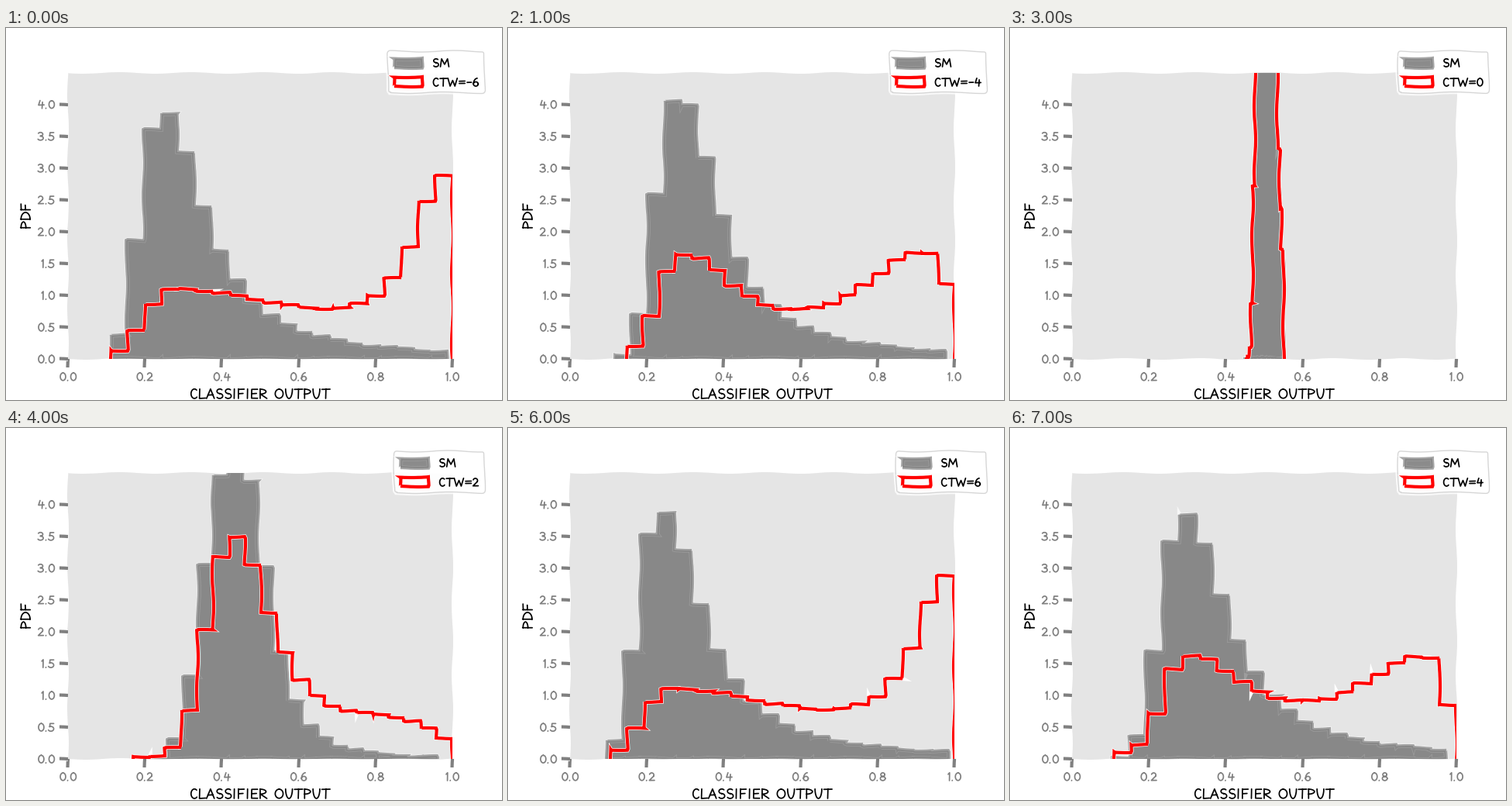
A matplotlib script that plays this animation: 640x480 px, repeating every 8 s.

```python
import numpy as np
import matplotlib.pyplot as plt
from matplotlib.animation import ArtistAnimation
from matplotlib.patches import FancyBboxPatch, PathPatch, Rectangle
from matplotlib.path import Path
from matplotlib.transforms import Affine2D

W, H = 640, 480
STEPS = [-6, -4, -2, 0, 2, 4, 6, 4]
SM_STYLE = dict(fc="gray", ec="gray", alpha=.7, lw=3)
CTW_STYLE = dict(ec="red", lw=3)

# Range of the output, then its main peak (mid, height, rise, fall, power)
SPIKE = (.45, .55, (.5, 25, .02, .02, 3))
SM = {
    -6: (.110, .986, (.250, 3.90, .084, .128, 2)),
    -4: (.116, .976, (.285, 4.15, .083, .120, 2)),
    -2: (.191, .964, (.420, 5.00, .098, .104, 3)),
    0: SPIKE,
    2: (.183, .960, (.430, 4.75, .100, .100, 3)),
    4: (.105, .974, (.295, 3.85, .088, .132, 2)),
    6: (.095, .984, (.240, 3.90, .084, .128, 2)),
}
# The same, followed by a mirrored second peak near one
CTW = {
    -6: (.110, 1, (.280, 1.05, .105, .42, 2), (.975, 2.60, .100, .095, 2)),
    -4: (.147, 1, (.300, 1.50, .089, .16, 2), (.920, 1.60, .086, .200, 2)),
    -2: (.200, 1, (.425, 3.40, .100, .11, 2), (.850, 0.42, .140, .200, 2)),
    0: SPIKE,
    2: (.170, 1, (.437, 3.40, .102, .115, 2), (.850, 0.42, .140, .200, 2)),
    4: (.109, 1, (.305, 1.45, .088, .19, 2), (.920, 1.50, .067, .220, 2)),
    6: (.104, 1, (.270, 1.05, .105, .42, 2), (.975, 2.60, .100, .095, 2)),
}


def bump(x, mid, height, rise, fall, power):
    """Peak with a steep left flank and a long right tail."""
    d = np.abs(x - mid)
    left, right = np.exp(-(d / rise) ** 2.5), 1 / (1 + (d / fall) ** power)
    return height * np.where(x < mid, left, right)


def histogram(lo, hi, peak, end=None, **style):
    edges = np.linspace(lo, hi, 21)
    mids = (edges[1:] + edges[:-1]) / 2
    density = bump(mids, *peak)
    if end:
        density += bump(-mids, -end[0], *end[1:])
    return list(ax.hist(mids, edges, weights=density, **style)[2])


def line(*xy):
    return Path(np.reshape(xy, (-1, 2)))


def arc(x, y, rx, ry, start, stop):
    t = np.radians(np.linspace(start, stop, 24))
    return Path(np.column_stack([x + rx * np.cos(t), y + ry * np.sin(t)]))


# Handwritten letters of cap height 1, built from shared strokes
STEM = line(.07, 1, .07, 0)
BOWL = arc(.07, .72, .62, .26, 90, -90)
RING = arc(.4, .5, .34, .48, 90, 450)
GLYPHS = {
    " ": [],
    "A": [line(0, 0, .42, 1, .82, 0), line(.16, .36, .68, .38)],
    "C": [arc(.42, .5, .36, .5, 50, 315)],
    "D": [STEM, arc(.07, .5, .72, .48, 90, -90)],
    "E": [line(.7, .97, .08, .96, .06, .03, .7, .02), line(.07, .5, .58, .53)],
    "F": [STEM, line(.07, .96, .68, .98), line(.07, .5, .56, .53)],
    "I": [line(.14, 1, .12, 0)],
    "L": [line(.08, 1, .05, 0, .68, .04)],
    "M": [line(.05, 0, .2, 1, .58, .3, .95, 1, 1.12, 0)],
    "O": [arc(.48, .5, .42, .48, 90, 450)],
    "P": [STEM, BOWL],
    "R": [STEM, BOWL, line(.12, .45, .78, 0)],
    "S": [arc(.4, .76, .3, .24, 40, 270), arc(.38, .26, .33, .26, 90, -145)],
    "T": [line(0, .96, .86, .98), line(.43, .97, .4, 0)],
    "U": [arc(.42, 1, .36, 1, 180, 360)],
    "W": [line(0, 1, .28, 0, .6, .72, .88, 0, 1.18, 1)],
    "=": [line(.08, .62, .8, .64), line(.08, .34, .8, .35)],
    "-": [line(.08, .47, .62, .48)],
    ".": [line(.08, 0, .1, .04)],
    "0": [RING],
    "1": [line(.02, .8, .2, 1, .18, 0)],
    "2": [arc(.32, .7, .28, .28, 160, -30), line(.56, .56, .03, .03, .68, .04)],
    "3": [arc(.3, .76, .3, .23, 150, -90), arc(.3, .27, .36, .26, 90, -150)],
    "4": [line(.25, 1, .06, .42, .76, .45), line(.56, .8, .5, 0)],
    "5": [line(.66, .97, .2, .97, .15, .57), arc(.3, .3, .36, .3, 115, -150)],
    "6": [arc(.6, .27, .52, .73, 95, 180), arc(.38, .27, .3, .27, 0, 360)],
    "8": [arc(.38, .76, .25, .23, 0, 360), arc(.38, .27, .31, .26, 0, 360)],
}
ADVANCE = {"A": 1, "I": .5, "L": .8, "M": 1.35, "O": 1.1, "R": .95, "T": 1,
           "U": 1, "D": 1, "W": 1.35, "=": 1, "-": .8, ".": .42, "1": .45, " ": .65}


def advance(ch):
    return ADVANCE.get(ch, .9)


def width(text):
    return sum(map(advance, text)) - .15


plt.xkcd()
fig = plt.figure(figsize=(W / 100, H / 100), dpi=100)
PX = Affine2D().scale(1 / W, 1 / H) + fig.transFigure


def write(text, x, y, size, color="black", align=0, angle=0):
    """Handwrite text; align is the share of its width left of x."""
    pen, paths = -align * width(text), []
    for ch in text:
        shift = Affine2D().translate(pen, 0)
        paths += [shift.transform_path(p) for p in GLYPHS[ch]]
        pen += advance(ch)
    place = Affine2D().scale(size).rotate_deg(angle).translate(x, y)
    patch = PathPatch(place.transform_path(Path.make_compound_path(*paths)),
                      fill=False, ec=color, lw=1.25, capstyle="round",
                      joinstyle="round", transform=PX)
    patch.set_sketch_params(None)
    patch.set_path_effects([])
    return fig.add_artist(patch)


def legend(label):
    text_x = 610 - 10.2 * width(label)
    left = text_x - 58
    box = FancyBboxPatch((left, 396.5), 617.5 - left, 53.5, fc="white", ec="0.8",
                         alpha=.8, lw=1, transform=PX,
                         boxstyle="round,pad=0,rounding_size=3.5")
    filled = Rectangle((left + 8, 429.5), 36, 12, transform=PX, **SM_STYLE)
    hollow = Rectangle((left + 8, 405), 36, 12, fill=False, transform=PX, **CTW_STYLE)
    parts = [fig.add_artist(p) for p in (box, filled, hollow)]
    return parts + [write("SM", text_x, 430, 10.2), write(label, text_x, 405, 10.2)]


ax = fig.add_axes([.125, .11, .775, .77], facecolor="#e5e5e5")
ax.spines[:].set_visible(False)

scenes = [histogram(*SM[c], histtype="stepfilled", **SM_STYLE)
          + histogram(*CTW[c], histtype="step", **CTW_STYLE)
          + legend(f"CTW={c}") for c in STEPS]

x_ticks, y_ticks = np.linspace(0, 1, 6), np.linspace(0, 4, 9)
ax.set(xlim=(0, 1), ylim=(0, 4.5), xticks=x_ticks, yticks=y_ticks)
ax.tick_params(color="gray", labelbottom=False, labelleft=False)
for v in x_ticks:
    write(f"{v:.1f}", 80 + 496 * v, 25, 10.2, "gray", align=.5)
for v in y_ticks:
    write(f"{v:.1f}", 62.5, 47.7 + 82.13 * v, 10.2, "gray", align=1)
write("CLASSIFIER OUTPUT", 328, 2, 12.2, align=.5)
write("PDF", 31.3, 237.6, 12.2, align=.5, angle=90)

anim = ArtistAnimation(fig, scenes, interval=1000, repeat=True, repeat_delay=0)
plt.show()
```
